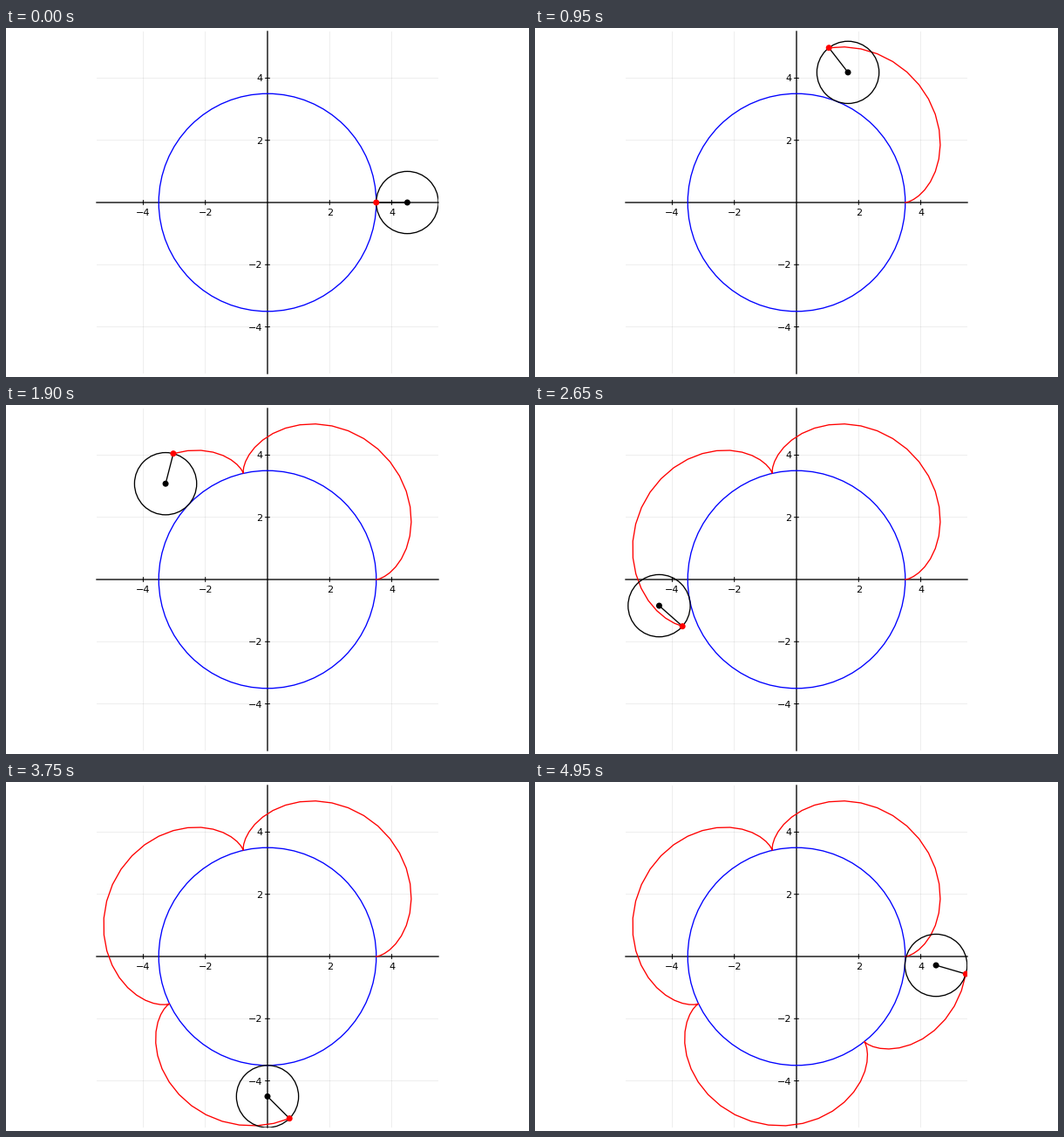
Animation, 600 px wide and 400 px high, one loop 5000 ms. Source, as a matplotlib script:

```python
import numpy as np
import matplotlib.pyplot as plt
from matplotlib.animation import FuncAnimation
from matplotlib.patches import Circle

W, H, DPI = 600, 400, 100
PT = 72 / DPI                # points per pixel
LIM = 5.5
UNIT = 392.08 / (2 * LIM)    # pixels per data unit
BIG, SMALL = 3.5, 1.0
FRAMES, STEP_MS = 100, 50
LINE = 1.33 * PT

theta = 2 * np.pi * np.arange(FRAMES) / FRAMES
arm = BIG + SMALL
spin = arm / SMALL * theta
hub = arm * np.column_stack([np.cos(theta), np.sin(theta)])
pen = hub - SMALL * np.column_stack([np.cos(spin), np.sin(spin)])

fig = plt.figure(figsize=(W / DPI, H / DPI), dpi=DPI, facecolor="white")
side = 2 * LIM * UNIT
ax = fig.add_axes([(W - side) / 2 / W, (H - side) / 2 / H, side / W, side / H])
ax.set(xlim=(-LIM, LIM), ylim=(-LIM, LIM))
ax.axis("off")


def segment(x, y, **style):
    return ax.plot(x, y, snap=False, **style)[0]


def ring(radius, color, z):
    return ax.add_patch(Circle((0, 0), radius, fill=False, ec=color, lw=LINE, zorder=z))


def dot(color, z):
    return ax.add_patch(Circle((0, 0), 3.5 / UNIT, fc=color, lw=0, zorder=z))


def draw_axes():
    span = (-LIM, LIM)
    tick = (-2.4 / UNIT, 2.4 / UNIT)
    grid = dict(color="black", alpha=0.1, lw=LINE / 2, zorder=1)
    mark = dict(color="black", lw=PT, zorder=2)
    axis = dict(color="black", lw=LINE, zorder=2, clip_on=False,
                solid_capstyle="projecting")
    text = dict(fontsize=8, family="DejaVu Sans", color="black", zorder=2)
    for v in (-4, -2, 2, 4):
        at = (v, v)
        segment(at, span, **grid)
        segment(span, at, **grid)
        segment(at, tick, **mark)
        segment(tick, at, **mark)
        label = str(v).replace("-", "\u2212")
        ax.text(v, -11 / UNIT, label, ha="center", va="center_baseline", **text)
        ax.text(-5.3 / UNIT, v, label, ha="right", va="center_baseline", **text)
    segment(span, (0, 0), **axis)
    segment((0, 0), span, **axis)


draw_axes()
ring(BIG, "blue", 3)
trace = segment([], [], color="red", lw=LINE, zorder=4)
wheel = ring(SMALL, "black", 5)
spoke = segment([], [], color="black", lw=LINE, zorder=6)
hub_dot = dot("black", 7)
pen_dot = dot("red", 8)


def update(i):
    trace.set_data(pen[:i + 1, 0], pen[:i + 1, 1])
    wheel.center = hub_dot.center = hub[i]
    pen_dot.center = pen[i]
    spoke.set_data(*np.array([hub[i], pen[i]]).T)
    return trace, wheel, spoke, hub_dot, pen_dot


anim = FuncAnimation(fig, update, frames=FRAMES, interval=STEP_MS,
                     repeat=True, repeat_delay=0)
plt.show()
```
